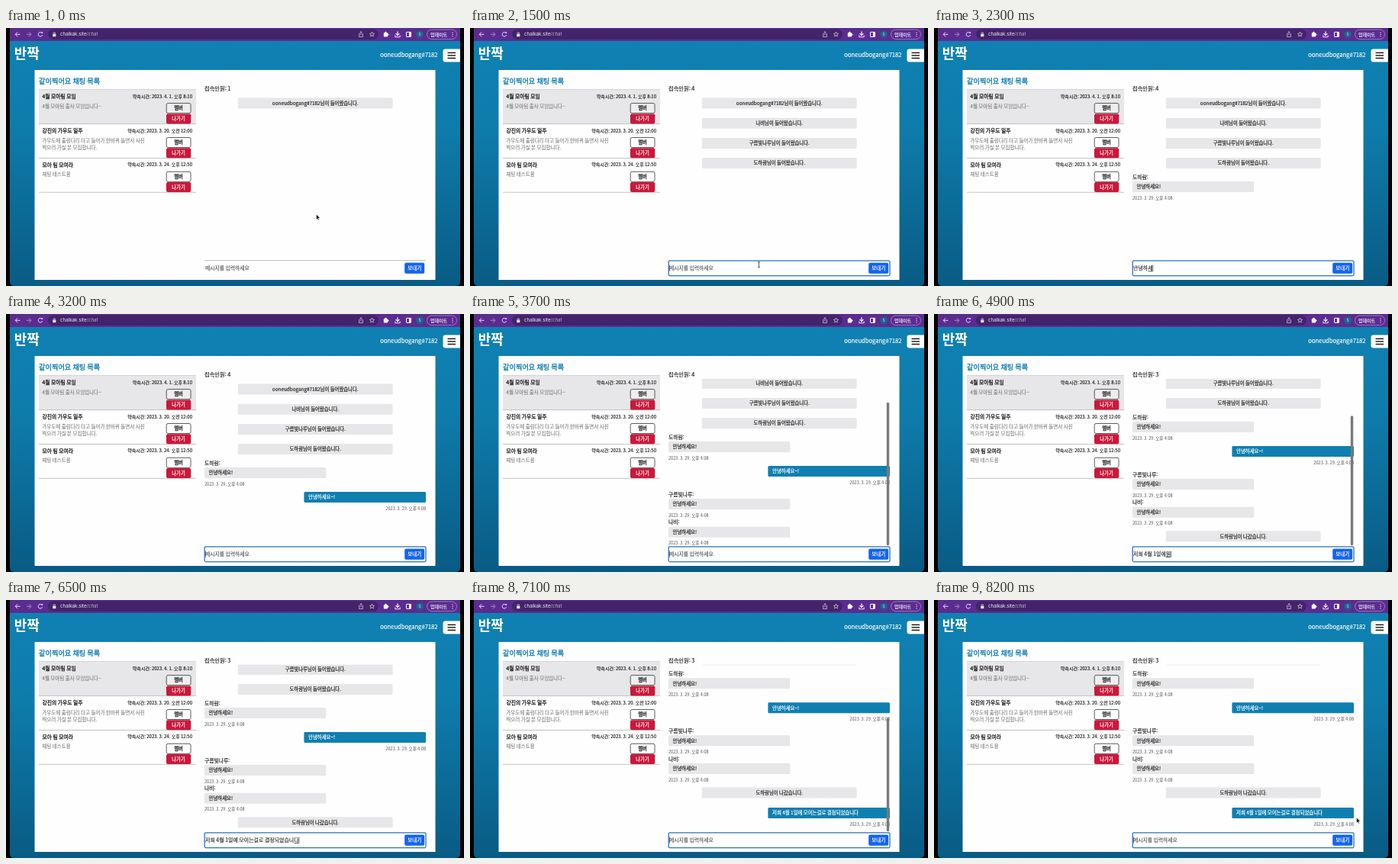
Animation, 600 px wide and 338 px high, one loop 8.3 s. Source, as an HTML page with a canvas:

```html
<!DOCTYPE html>
<html lang="ko">
<head>
<meta charset="utf-8">
<title>채팅</title>
<style>
html, body { margin: 0; width: 100%; height: 100%; overflow: hidden; background: #000; }
canvas { display: block; width: 600px; height: 338px; }
</style>
</head>
<body>
<canvas id="stage" width="600" height="338"></canvas>
<script>
const ctx = document.getElementById('stage').getContext('2d');
const LOOP = 8300;
const FONT = '"Noto Sans CJK KR", "Noto Sans CJK", "Noto Sans", sans-serif';
const UI_FONT = 'Inter, Roboto, sans-serif';
const BLUE = '#0f7fb0', GRAY = '#e7e6e8', INK = '#222', RULE = '#b4b4b6';
const BAR = '#5b2c90', FIELD = '#43236a';
const USER = 'ooneudbogang#7182', ANN = '나비', BEA = '구름빛나루', CAL = '도하람';
const STAMP = '2023. 3. 29. 오후 4:08';
const GREETING = '안녕하세요~!', NOTICE = '저희 4월 1일에 모이는걸로 결정되었습니다';
const VIEW = { top: 84.8, bottom: 304 };

// y is the vertical centre of the item's first row inside the scrolling list
const messages = [
  { at: 0, kind: 'system', y: 98.4, text: USER + '님이 들어왔습니다.' },
  { at: 700, kind: 'system', y: 124.7, text: ANN + '님이 들어왔습니다.' },
  { at: 900, kind: 'system', y: 151, text: BEA + '님이 들어왔습니다.' },
  { at: 1200, kind: 'system', y: 177.1, text: CAL + '님이 들어왔습니다.' },
  { at: 1700, kind: 'other', y: 195, name: CAL, text: '안녕하세요!' },
  { at: 2900, kind: 'own', y: 240, text: GREETING },
  { at: 3400, kind: 'other', y: 270, name: BEA, text: '안녕하세요!' },
  { at: 3700, kind: 'other', y: 306.7, name: ANN, text: '안녕하세요!' },
  { at: 4700, kind: 'system', y: 351.3, text: CAL + '님이 나갔습니다.' },
  { at: 6700, kind: 'own', y: 377.8, text: NOTICE }
];
const scrolls = [[0, 0], [3700, 34], [4700, 60], [6700, 98.7]];
const members = [[0, 1], [700, 2], [900, 3], [1200, 4], [4700, 3]];

// The time at which each character of a line is typed
const greetingKeys = [1900, 2100, 2200, 2300, 2500, 2600, 2700];
const noticeKeys = [...Array.from({ length: 10 }, (_, i) => 3900 + 100 * i),
  ...Array.from({ length: 8 }, (_, i) => 5000 + 100 * i), 5900, 6100, 6200, 6400, 6500];

const latest = (steps, t) => steps.filter(s => s[0] <= t).pop();
const clamp01 = v => Math.max(0, Math.min(1, v));
const ease = v => v * v * (3 - 2 * v);

function box(x, y, w, h, fill, radius = 0, stroke, width = 1) {
  ctx.beginPath();
  ctx.roundRect(x, y, w, h, radius);
  if (fill) { ctx.fillStyle = fill; ctx.fill(); }
  if (stroke) { ctx.strokeStyle = stroke; ctx.lineWidth = width; ctx.stroke(); }
}

function path(points, color, width = 1, fill) {
  ctx.beginPath();
  points.forEach(([x, y], i) => i ? ctx.lineTo(x, y) : ctx.moveTo(x, y));
  if (fill) { ctx.closePath(); ctx.fillStyle = fill; ctx.fill(); }
  if (color) { ctx.strokeStyle = color; ctx.lineWidth = width; ctx.stroke(); }
}

function arc(x, y, r, color, width, from = 0, to = 7) {
  ctx.beginPath();
  ctx.arc(x, y, r, from, to);
  ctx.strokeStyle = color;
  ctx.lineWidth = width;
  ctx.stroke();
}

// Large glyphs scaled down keep fractional advances; y is the vertical centre.
// A thin outline stands in for the medium weight.
function text(str, x, y, size, color = INK, align = 'left', { weight = 400, outline = 3, font = FONT } = {}) {
  ctx.save();
  ctx.translate(x, y + size * 0.37);
  ctx.scale(size / 100, size / 100);
  ctx.font = `${weight} 100px ${font}`;
  ctx.textAlign = align;
  ctx.lineJoin = 'round';
  ctx.fillStyle = ctx.strokeStyle = color;
  ctx.fillText(str, 0, 0);
  if (outline) {
    ctx.lineWidth = outline;
    ctx.strokeText(str, 0, 0);
  }
  const width = ctx.measureText(str).width * size / 100;
  ctx.restore();
  return width;
}

function drawBrowserBar() {
  const icon = '#e6dcf0';
  box(5, 0, 590, 17, BAR);
  path([[18.5, 8.3], [12.3, 8.3]], icon);
  path([[15.2, 5.3], [12.2, 8.3], [15.2, 11.3]], icon);
  path([[27, 8.3], [33, 8.3]], '#a58cc2');
  path([[30, 5.3], [33, 8.3], [30, 11.3]], '#a58cc2');
  arc(45, 8.3, 2.8, icon, 1, 0.3, 5.5);
  path([[45.8, 7], [48.2, 7], [48.2, 4.6]], null, 0, icon);
  box(55, 1.5, 433, 13.5, FIELD, 6.7);
  box(61.2, 7.5, 4.2, 3.7, icon, 0.5);
  arc(63.3, 7.2, 1.4, icon, 0.8, Math.PI, 2 * Math.PI);
  const ui = { font: UI_FONT, outline: 0 };
  const w = text('chalkak.site', 71, 8.2, 6.2, '#f4eff8', 'left', ui);
  text('/chat', 71 + w, 8.2, 6.2, '#c0b0d2', 'left', ui);
  path([[463.6, 7.4], [462.6, 7.4], [462.6, 11.6], [467.4, 11.6], [467.4, 7.4], [466.4, 7.4]], icon, 0.7);
  path([[465, 9.5], [465, 4.8]], icon, 0.7);
  path([[463.6, 6], [465, 4.6], [466.4, 6]], icon, 0.7);
  const star = Array.from({ length: 11 }, (_, i) => {
    const a = i * Math.PI / 5 - Math.PI / 2, r = i % 2 ? 1.5 : 3.3;
    return [479.5 + r * Math.cos(a), 8.4 + r * Math.sin(a)];
  });
  path(star, icon, 0.7);
  box(494.8, 6.2, 5.2, 5.2, '#fff', 0.6);
  box(496.3, 4.7, 2.2, 3, '#fff', 1);
  box(499, 7.6, 2.5, 2.2, '#fff', 1);
  path([[513, 4.5], [513, 9.3]], '#fff', 1.2);
  path([[510.6, 7.2], [513, 9.6], [515.4, 7.2]], '#fff', 1.1);
  path([[509.8, 9.5], [509.8, 11.8], [516.2, 11.8], [516.2, 9.5]], '#fff', 0.9);
  box(524.5, 5.4, 6, 6, null, 0.5, '#fff', 1);
  box(528, 5.4, 2.5, 6, '#fff');
  box(537.5, 3.7, 9.2, 9.2, '#17698c', 4.6);
  text('S', 542.1, 8.3, 5, '#dce8f5', 'center', ui);
  box(551.5, 2, 39, 12.7, BAR, 6.3, '#b39fcb', 0.7);
  text('업데이트', 556, 8.3, 6, '#f6f0fa');
  for (let i = -1; i < 2; i++) box(584.4, 7.8 + i * 2.5, 1.2, 1.2, '#fff', 0.6);
}

function drawRoom(top, title, time, lines, selected) {
  if (selected) box(43, top, 206, 45, GRAY);
  path([[43, top + 45], [249, top + 45]], RULE, 0.8);
  text(title, 47.5, top + 9.2, 6.8, INK, 'left', { outline: 4 });
  text('약속시간: ' + time, 244, top + 8.8, 6, INK, 'right');
  lines.forEach((line, i) => text(line, 47.3, top + 21.7 + i * 9.4, 6.5, '#777', 'left', { outline: 1 }));
  box(210.2, top + 18, 31.8, 13, selected ? '#efeeef' : '#fff', 2, '#333', 0.8);
  text('멤버', 226, top + 24.4, 6.3, INK, 'center', { outline: 4 });
  box(210, top + 31.8, 32.3, 13, '#c9193b', 2);
  text('나가기', 226, top + 38.4, 6.3, '#fff', 'center');
}

function drawPage() {
  const shade = ctx.createLinearGradient(0, 17, 0, 338);
  shade.addColorStop(0, '#0f81b2');
  shade.addColorStop(0.35, '#0e7cab');
  shade.addColorStop(1, '#095b84');
  box(5, 17, 590, 321, shade, [0, 0, 5, 5]);
  text('반짝', 10.8, 33.5, 18, '#fff', 'left', { weight: 700, outline: 0 });
  text(USER, 565.5, 35.5, 7.6, '#fff', 'right', { outline: 2 });
  box(572.5, 27.5, 22.5, 17, '#fff', [3, 0, 0, 3]);
  for (let i = 0; i < 3; i++) box(578.5, 31.8 + i * 3.5, 10.5, 1.4, '#111');
  box(37.5, 55, 525, 275, '#fefefe');
  text('같이찍어요 채팅 목록', 43, 70, 9.2, BLUE, 'left', { outline: 4 });
  path([[43, 80.5], [249, 80.5]], RULE, 0.8);
  drawRoom(80.6, '4월 모아팀 모임', '2023. 4. 1. 오후 8:10', ['4월 모아팀 출사 모임입니다~'], true);
  drawRoom(125.5, '강진의 가우도 일주', '2023. 3. 20. 오전 12:00',
    ['가우도에 출렁다리 타고 들어가 한바퀴 돌면서 사진', '찍으러 가실 분 모집합니다.']);
  drawRoom(170.3, '모아 팀 모여라', '2023. 3. 24. 오후 12:50', ['채팅 테스트용']);
}

function drawMessage({ kind, y, name, text: body }) {
  if (kind === 'system') {
    box(303.8, y - 7, 202.8, 14, GRAY, 1.5);
    text(body, 405.2, y, 6.35, INK, 'center');
  } else if (kind === 'other') {
    text(name + ':', 260, y, 6.8);
    box(260, y + 6, 159.3, 14, GRAY, 1.5);
    text(body, 265.5, y + 13, 6.4);
    text(STAMP, 260, y + 27.5, 5.6, '#666', 'left', { outline: 1 });
  } else {
    box(390.4, y - 7, 159.6, 14, BLUE, 1.5);
    text(body, 396, y, 6.4, '#fff');
    text(STAMP, 550, y + 15, 5.6, '#666', 'right', { outline: 1 });
  }
}

function drawChat(t) {
  text('접속인원: ' + latest(members, t)[1], 260, 79.3, 7.25);
  const [since, offset] = latest(scrolls, t);
  ctx.save();
  ctx.beginPath();
  ctx.rect(255, VIEW.top, 300, VIEW.bottom - VIEW.top);
  ctx.clip();
  ctx.translate(0, -offset);
  messages.filter(m => m.at <= t).forEach(drawMessage);
  ctx.restore();
  if (offset) {
    const track = 217, thumb = track * track / (track + offset);
    ctx.globalAlpha = clamp01((since + 900 - t) / 300);
    box(545.8, 303.3 - thumb, 3.4, thumb, '#77797c', 1.7);
    ctx.globalAlpha = 1;
  }
}

function typedText(t) {
  const typed = (str, keys) => str.slice(0, keys.filter(k => k <= t).length);
  if (t < 2900) return typed(GREETING, greetingKeys);
  if (t >= 6700) return '';
  if (t >= 4900 && t < 5000) return NOTICE.slice(0, 9) + '원';
  return typed(NOTICE, noticeKeys);
}

function drawInput(t) {
  const focused = t >= 1400;
  if (focused) box(260.2, 304.8, 289.8, 19.8, '#fff', 1.5, '#2a70bd', 1.3);
  else path([[260, 304.5], [550, 304.5]], RULE, 0.8);
  const value = typedText(t);
  const width = text(value || '메시지를 입력하세요', 261, 314.5, value ? 6.95 : 6.8, value ? INK : '#555',
    'left', { outline: 2 });
  if (focused) box(261 + (value ? width : 0), 310.5, 0.6, 8, INK);
  if (/[가-힣]$/.test(value)) box(261 + width - 6.3, 318.3, 6.3, 0.7, INK);
  box(522.2, 307.5, 26, 14.2, '#1464ee', 2);
  text('보내기', 535.2, 314.5, 6.4, '#fff', 'center');
}

function drawPointer(t) {
  if (t >= 1800 && t < 7500) return;
  const leaving = t >= 7500;
  const p = ease(leaving ? clamp01((t - 7500) / 700) : clamp01((t - 800) / 600));
  const [x0, y0, x1, y1] = leaving ? [378.5, 310, 553.5, 285] : [406.5, 244, 378.5, 310];
  const x = x0 + (x1 - x0) * p, y = y0 + (y1 - y0) * p;
  if (y > 304 && x < 522) {
    path([[x, y - 3], [x, y + 3]], '#333', 0.8);
    for (const end of [-3.3, 3.3]) path([[x - 1.6, y + end], [x + 1.6, y + end]], '#333', 0.8);
    return;
  }
  const shape = [[0, 0], [0, 6.2], [1.4, 4.9], [2.3, 7], [3.3, 6.5], [2.4, 4.5], [4.3, 4.4], [0, 0]];
  path(shape.map(([dx, dy]) => [x + dx * 1.15, y + dy * 1.15]), '#fff', 0.5, '#111');
}

function frame(now) {
  const t = now % LOOP;
  box(0, 0, 600, 338, '#000');
  drawPage();
  drawBrowserBar();
  drawChat(t);
  drawInput(t);
  drawPointer(t);
  requestAnimationFrame(frame);
}
requestAnimationFrame(frame);
</script>
</body>
</html>
```
